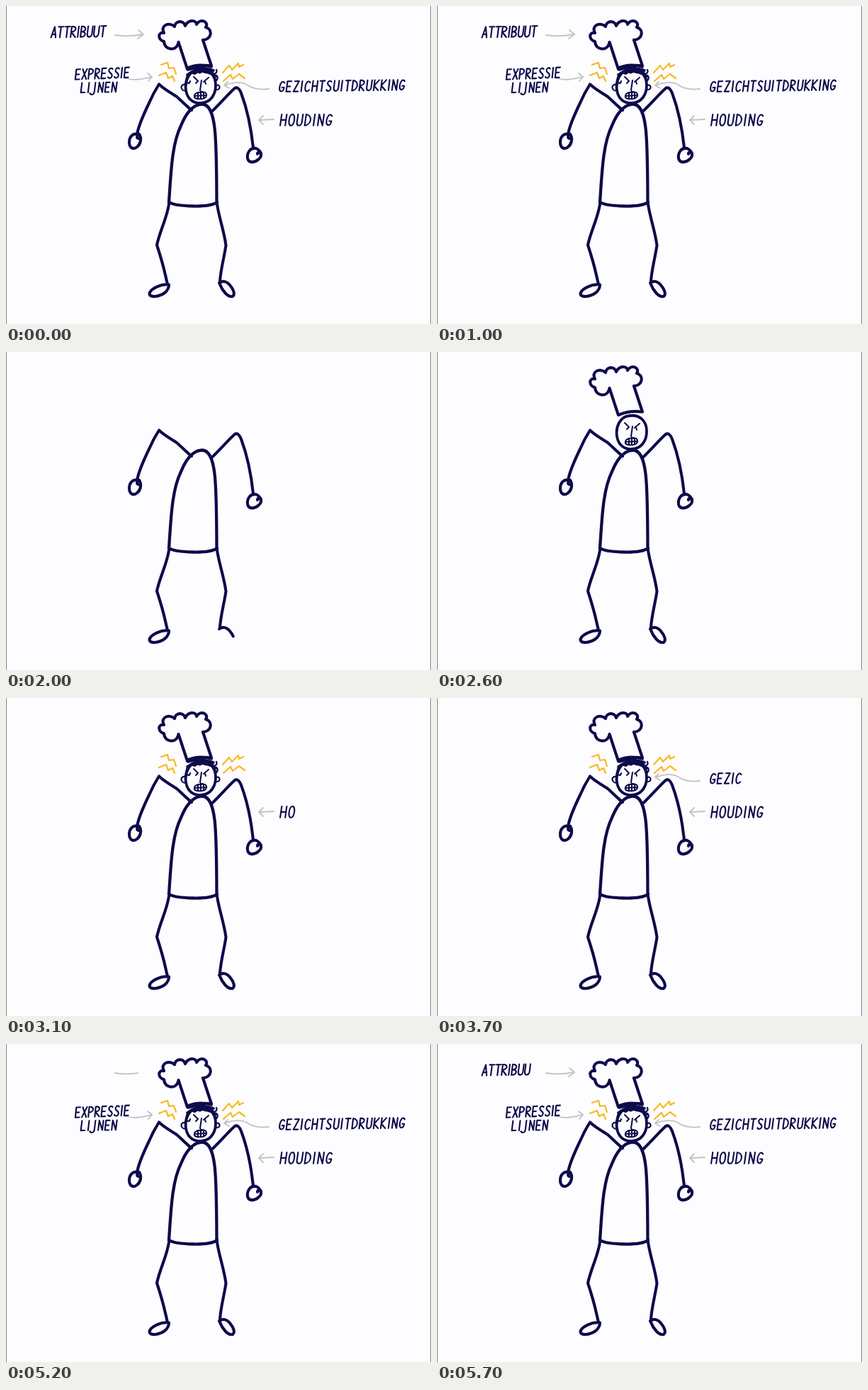
Animation of 600 by 449 pixels, one loop 5800 ms. Source, as an HTML page:

```html
<!DOCTYPE html>
<html lang="nl">
<head>
<meta charset="utf-8">
<title>Boze kok</title>
<style>
html, body { margin: 0; width: 100%; height: 100%; overflow: hidden; background: #fdfcfe; }
svg { display: block; width: 100vw; height: 100vh; }
path { fill: none; stroke-linecap: round; stroke-linejoin: round; }
</style>
</head>
<body>
<svg viewBox="0 0 600 449">
  <path d="M.5 0V449M599.5 0V449" stroke="#858585"/>
  <g id="art"></g>
</svg>
<script>
const LOOP = 5800, STEP = 100, FADE = 1000, CLEAR = 1300;
const NAVY = '#0e0b4b', GOLD = '#f8b823', GREY = '#c3c3c3';
const art = document.getElementById('art');
const updates = [];

function add(parent, tag, attrs) {
  const el = document.createElementNS('http://www.w3.org/2000/svg', tag);
  for (const key in attrs) el.setAttribute(key, attrs[key]);
  return parent.appendChild(el);
}

// Draws the strokes of a path one after another between two times.
function sketch(from, to, color, width, d) {
  let total = 0;
  const strokes = d.match(/M[^M]+/g).map(part => {
    const el = add(art, 'path', { d: part, stroke: color, 'stroke-width': width });
    const stroke = { el, start: total, len: el.getTotalLength() };
    total += stroke.len;
    return stroke;
  });
  updates.push(t => {
    const pen = total * Math.min(1, (t - from) / (to - from));
    for (const { el, start, len } of strokes) {
      const drawn = pen - start;
      el.style.visibility = drawn > 0 ? 'visible' : 'hidden';
      el.style.strokeDasharray = drawn < len ? `${Math.max(0, drawn)} 999` : 'none';
    }
  });
}

// Hand lettering: pen strokes on a grid ten units high.
const glyphs = {
  A: 'M0 10L2.4 0L4.4 10M1 7H4',
  B: 'M0 0V10M0 0C5 0 5 5 0 5C6 5 5 10 0 10',
  C: 'M4.3 1.5C2-1.5 0 2 0 5.5C0 10.5 2.5 11 4.3 8.5',
  D: 'M0 0V10M0 0C6 1 6 9 0 10',
  E: 'M4 0H0V10H4M0 5H3.3',
  G: 'M4.3 1.5C2-1.5 0 2 0 5.5C0 11 4.5 11 4.4 6H2.4',
  H: 'M0 0V10M4.5 0V10M0 5H4.5',
  I: 'M.5 0V10',
  J: 'M3 0V9C3 13 0 13-1.5 11',
  K: 'M0 0V10M4.3 0L0 5.5L4.4 10',
  L: 'M0 0V10H4',
  N: 'M0 10V0L4.3 10V0',
  O: 'M2.4 0C-.8 0-.8 10 2.2 10C5.4 10 5.4 0 2.4 0',
  P: 'M0 10V0C5.5-.5 5.5 5.5 0 5.5',
  R: 'M0 10V0C5.5-.5 5 5 0 5L4.4 10',
  S: 'M4 1C2-1 0 1 .6 3C1 5 4.4 5 4 8C3.5 10.5 1 10.5 0 8.8',
  T: 'M2.2 0V10M0 0H4.6',
  U: 'M0 0V7C0 11 4.4 11 4.4 7V0',
  X: 'M0 0L4.3 10M4.3 0L0 10',
  Z: 'M.3 0H4.3L0 10H4.3'
};

// Writes a word letter by letter; x, y is its top left corner.
function letter(from, pace, text, x, y, size, tilt, gap) {
  const word = add(art, 'g', {
    role: 'img', 'aria-label': text, stroke: NAVY, 'stroke-width': 2.1 / size,
    transform: `translate(${x + 2.3} ${y}) rotate(${tilt}) scale(${size}) skewX(-8)`
  });
  let at = 0;
  const letters = [...text].map(c => {
    const el = add(word, 'path', { d: glyphs[c], transform: `translate(${at})` });
    at += (c === 'I' ? 2.6 : 5.6) + gap;
    return el;
  });
  updates.push(t => {
    const count = Math.floor((t - from) / pace);
    letters.forEach((el, i) => el.style.visibility = i < count ? 'visible' : 'hidden');
  });
}

// Body
sketch(1650, 1810, NAVY, 4.3, 'M230 277C233 235 234 195 247 169C255 149 265 139 277 138.5C298 140 297 190 297.5 279M230 277Q238 282 264 282.5Q290 283 298 277');
sketch(1810, 1910, NAVY, 4.1,
  'M262 147C252 139 248 134 241 128C234 123 225 119 216 110.5Q208 123 202 137Q188 166 185.5 179' +
  'M186 181C179 179 174 185 174 192C174 201 180 203 185 199C190 195 192 187 188 181M190 187Q183 188 186 182' +
  'M291 148.5C304 136 313 125 323 116Q328 113 332 123C341 147 346 172 349 200' +
  'M352 201C345 200 340 207 341 215C343 223 352 221 357 216C362 212 361 205 353 201M360 208Q355 205 355 209');
sketch(1910, 2010, NAVY, 4.1,
  'M230 280C227 300 217 318 213 337.5Q221 362 225 380L228 393' +
  'M230 393.5C219 392 204 399 202.5 406C203 413 217 410 224 405Q230 400 230 393.5' +
  'M298 280C301 300 308 318 310.5 338C308 355 303 372 302 389' +
  'M301 391C306 387 312 389 316 394C321 400 324 407 320 410C313 412 305 401 302 393');

// Head, face and hat
sketch(2010, 2070, NAVY, 3.8, 'M272 90C258 91 252 106 254 119C256 132 265 138 276 137C289 136 296 125 296 112C296 98 287 88 272 90');
sketch(2070, 2160, NAVY, 2,
  'M265 100L271 106L268 109M286 101L279 107M281 107L282 110M276 105L274 119Q275 122 278 121' +
  'M266 127C266 122 274 121 281 122C285 125 283 130 277 131C269 132 265 130 266 127M266 127L283 126M271 122L271 131M275 122L275 131M279 122L279 130');
sketch(2160, 2500, NAVY, 4.1,
  'M243.5 51L256 89Q272 82 290 84.5L278 48' +
  'M243 53C240 64 224 63 223 50C214 48 214 36 223 38C217 27 231 22 238 29C239 20 251 20 253 28C257 19 269 19 269 26C275 16 287 23 282 30C292 33 291 47 278 48');

// Hair and ears
sketch(2600, 2740, NAVY, 3.6, 'M257 87Q273 80 290 86M257 90Q275 84 293 91M255 104Q256 95 263 93Q266 98 270 92Q274 96 278 91Q283 96 286 91Q293 92 295 103M256 97Q273 86 297 99');
sketch(2740, 2790, NAVY, 2.2, 'M294 96Q299 94 297 90M256 108Q259 111 260 106M296 106Q301 102 297 98M253 111C245 110 246 120 254 120M297 112C303 110 303 119 297 118');

// Anger bolts
sketch(2790, 2900, GOLD, 2.2,
  'M219 83L228 80L230 88L237 87L240 96M216 98L226 94L229 102L235 99L238 106' +
  'M306 94L315 84L319 90L328 81L329 86L335 83M307 106L317 97L320 103L329 96L337 102');

// Labels with their arrows
sketch(2900, 2980, GREY, 1.8, 'M378 160L358 161M363 155L357 161L363 167');
letter(2970, 46, 'HOUDING', 387, 153, 1.58, 0, 1.7);

sketch(3300, 3400, GREY, 1.8, 'M371 117C356 119 347 116 340 111C332 106 318 108 309 112M313 107L308 112L315 116');
letter(3410, 57, 'GEZICHTSUITDRUKKING', 385, 106.5, 1.45, -.8, 1.4);

sketch(4500, 4560, GREY, 1.8, 'M170 102C180 106 192 103 206 100M200 95L206 100L201 106');
letter(4555, 40, 'EXPRESSIE', 97, 89.5, 1.42, -2.2, .85);
letter(4915, 40, 'LIJNEN', 105, 108.5, 1.36, -1, 1.4);

sketch(5150, 5240, GREY, 1.8, 'M154 41Q172 44 193 40M187 34L194 40L186 46');
letter(5240, 57, 'ATTRIBUUT', 63, 29.5, 1.5, -1, .55);

function frame(now) {
  const t = Math.floor(now % LOOP / STEP) * STEP;
  const fading = t < CLEAR;
  art.style.opacity = fading ? Math.min(1, (CLEAR - t) / (CLEAR - FADE)) : 1;
  for (const update of updates) update(fading ? LOOP : t);
}

const begin = performance.now();
frame(0);
requestAnimationFrame(function tick() {
  frame(performance.now() - begin);
  requestAnimationFrame(tick);
});
</script>
</body>
</html>
```
